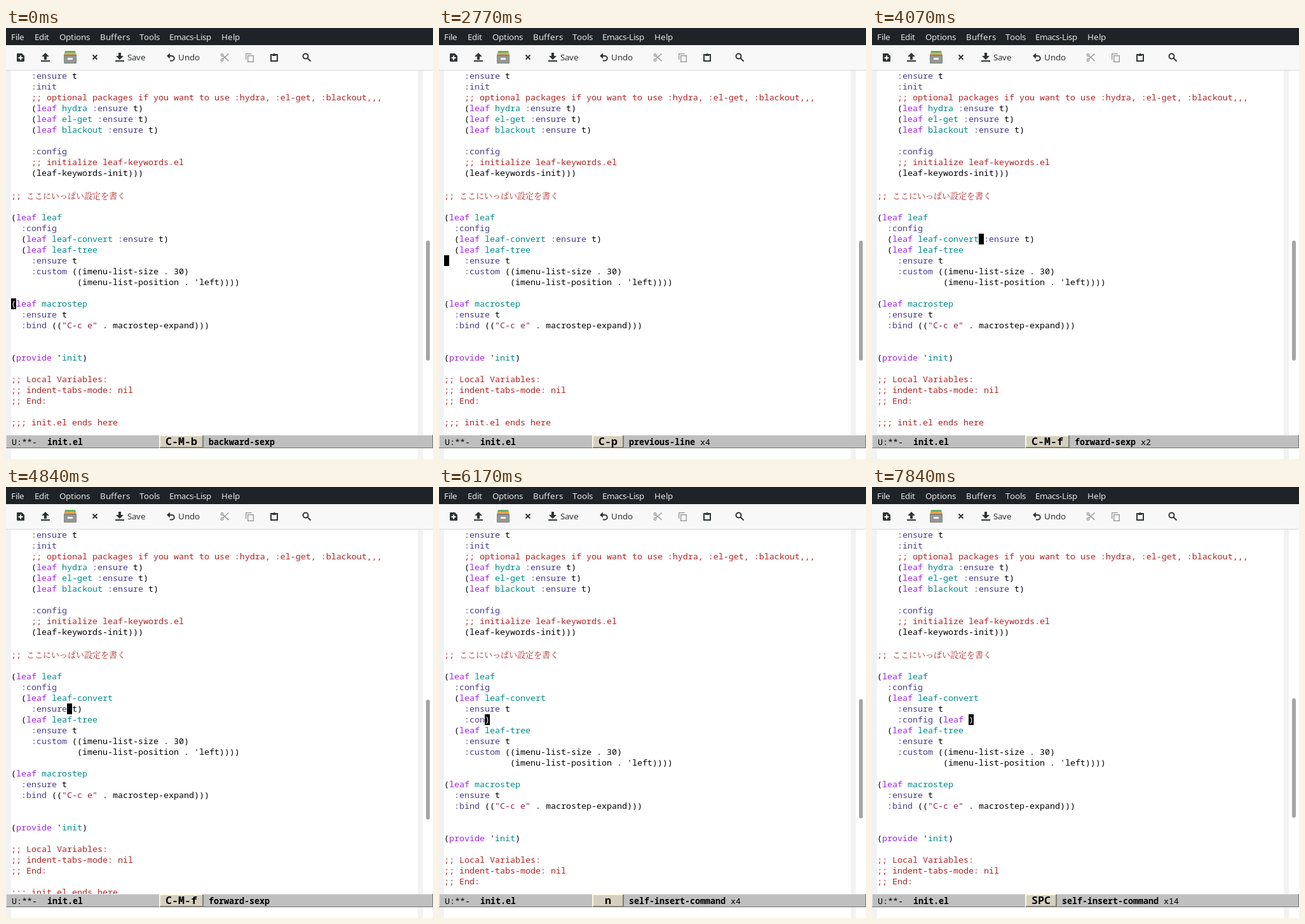
These frames come from a looping animation (672x679 px, 8000 ms). An HTML page:

```html
<!DOCTYPE html>
<html lang="ja">
<head>
<meta charset="utf-8">
<title>init.el</title>
<style>
  html, body { margin: 0; width: 100%; height: 100%; overflow: hidden; background: #fff; }
  svg { display: block; width: 672px; height: 679px; }
  text { white-space: pre; }
  .ui { font: 13.333px "Noto Sans", sans-serif; }
  .mono { font: 13.333px "Noto Sans Mono", monospace; }
  .bold { font-weight: bold; }
  .key { font-size: 16.667px; }
  .cjk { font: 13px "Noto Serif CJK JP", "Noto Sans CJK JP", serif; }
  .comment { fill: #b22222; }
  .string { fill: #8b2252; }
  .keyword { fill: #a020f0; }
  .constant { fill: #008b8b; }
  .builtin { fill: #483d8b; }
  .line { fill: none; stroke: #2f3436; stroke-width: 2; }
  .off { stroke: #8f9293; stroke-width: 1.3; }
</style>
</head>
<body>
<svg viewBox="0 0 672 679">
  <rect width="672" height="679" fill="#fff"/>
  <path d="M0 67h8v612H0zM648 67h8v612h-8z" fill="#f2f2f2"/>
  <rect id="thumb" x="661" width="6" rx="3" fill="#a4a6a6"/>

  <g id="code" class="mono"></g>
  <g id="cursor" class="mono">
    <rect width="8" height="17"/>
    <text y="13" fill="#fff"></text>
  </g>

  <rect width="672" height="27" fill="#1d2327"/>
  <rect y="27" width="672" height="39" fill="#f8f8f8"/>
  <rect y="66" width="672" height="1" fill="#dadada"/>
  <g id="menu" class="ui" fill="#e4e6e6"></g>
  <g id="tools" class="ui" fill="#2f3436"></g>

  <g fill="#2f3436">
    <path d="M17 41q0-1 1-1h7l4 4v8q0 1-1 1H18q-1 0-1-1z"/>
    <path d="M23 43.500v7M19.500 47h7" stroke="#f8f8f8" stroke-width="2"/>
    <path d="M62 39l6 6h-4v5h-4v-5h-4zM55 51h14v2H55z"/>
    <path d="M93 36h16l1 4H92z" fill="#63b56a"/>
    <path d="M92 39h18l1 4H91z" fill="#eda648"/>
    <rect x="91" y="42" width="20" height="14" rx="1" fill="#7f837f"/>
    <rect x="92" y="44" width="18" height="11" fill="#949894"/>
    <rect x="97" y="47" width="8" height="3" fill="#f4f4f2"/>
    <path class="line" d="M136.500 42.500l7 7M143.500 42.500l-7 7"/>
    <path d="M177 39h4v5h4l-6 6-6-6h4zM172 51h14v2h-14z"/>
    <path class="line" d="M256 44h5a3.700 3.700 0 0 1 0 7.500h-3"/>
    <path d="M253 44l5-4.500v9z"/>
    <g class="line off">
      <path d="M341 43.500l9.500 8.500M341 49l9.500-8.500"/>
      <circle cx="340" cy="42.500" r="1.800"/>
      <circle cx="340" cy="50.500" r="1.800"/>
      <path d="M377.700 50V40.700h9"/>
      <rect x="380.700" y="43.700" width="8.600" height="9.600"/>
    </g>
    <rect class="line" x="417" y="42" width="10" height="10"/>
    <path d="M419 41h1.500a1.600 1.600 0 0 1 3 0H425v3h-6z"/>
    <circle class="line" cx="471.500" cy="44.500" r="4"/>
    <path class="line" d="M474.500 47.500l5 5"/>
  </g>

  <rect y="641" width="672" height="21" fill="#bfbfbf"/>
  <path d="M0 641.500h672M.5 641v21" stroke="#e5e5e5"/>
  <path d="M0 661.500h672M671.500 641v21" stroke="#737373"/>
  <path d="M8 662h640v17H8z" fill="#fff"/>
  <path d="M0 662h8v17H0zM648 662h8v17h-8z" fill="#f2f2f2"/>
  <g class="mono">
    <text x="9" y="657">U:**-</text>
    <text x="65" y="657" class="bold">init.el</text>
    <rect id="cap" x="241" y="641" height="21" fill="#d5cfbf"/>
    <path id="light" fill="none" stroke="#fff8e5" stroke-width="2"/>
    <path id="shade" fill="none" stroke="#807c73" stroke-width="2"/>
    <text id="key" x="251" y="657" class="bold key"></text>
    <text id="command" y="657" class="bold"></text>
    <text id="count" y="657"></text>
  </g>
</svg>

<script>
const LOOP = 8000;
const CELL = 8;
const $ = id => document.getElementById(id);

const SOURCE = `    :ensure t
    :init
    ;; optional packages if you want to use :hydra, :el-get, :blackout,,,
    (leaf hydra :ensure t)
    (leaf el-get :ensure t)
    (leaf blackout :ensure t)

    :config
    ;; initialize leaf-keywords.el
    (leaf-keywords-init)))

;; ここにいっぱい設定を書く

(leaf leaf
  :config
  (leaf leaf-convert :ensure t)
  (leaf leaf-tree
    :ensure t
    :custom ((imenu-list-size . 30)
             (imenu-list-position . 'left))))

(leaf macrostep
  :ensure t
  :bind (("C-c e" . macrostep-expand)))


(provide 'init)

;; Local Variables:
;; indent-tabs-mode: nil
;; End:

;;; init.el ends here`.split("\n");

const EDIT_ROW = 15;
const VARIANTS = [
  () => ["  (leaf leaf-convert :ensure t)"],
  () => ["  (leaf leaf-convert", "    :ensure t)"],
  typed => ["  (leaf leaf-convert", "    :ensure t", `    ${typed})`],
];

// Build the key log: each run repeats one command and counts up.
const steps = [];
let breaks = 0, typed = "";
function run(key, command, times, spots) {
  times.forEach((time, i) => {
    const [row, col] = spots[i];
    if (command === "newline") breaks++;
    steps.push({ time, key, command, count: i + 1, row, col, breaks, typed });
  });
}
function type(text, times) {
  [...text].forEach((ch, i) => {
    typed += ch;
    steps.push({
      time: times[i], key: ch === " " ? "SPC" : ` ${ch} `, command: "self-insert-command",
      count: i + 1, row: 17, col: 4 + typed.length, breaks, typed,
    });
  });
}
run("C-M-b", "backward-sexp", [0], [[21, 0]]);
run("C-p", "previous-line", [2070, 2200, 2340, 2770, 2900, 3070],
  [20, 19, 18, 17, 16, 15].map(row => [row, 0]));
run("C-f", "forward-char", [3300, 3470, 3640], [[15, 1], [15, 2], [15, 3]]);
run("C-M-f", "forward-sexp", [3940, 4070], [[15, 7], [15, 20]]);
run("RET", "newline", [4440], [[16, 4]]);
run("C-M-f", "forward-sexp", [4840, 4970], [[16, 11], [16, 13]]);
run("RET", "newline", [5310], [[17, 4]]);
type(":config (leaf ",
  [5640, 6070, 6120, 6170, 6440, 6470, 6670, 7070, 7240, 7570, 7640, 7700, 7770, 7840]);

// [from, top, bottom] of the scroll bar thumb
const THUMB = [[0, 335, 524], [5310, 334, 523], [6070, 334, 522], [7570, 333, 521]];
const BLINK_OFF = [[170, 630], [1130, 1630]];

const TOKEN = new RegExp([
  "(?<comment>;.*)",
  '(?<string>"[^"]*")',
  "(?<keyword>(?<=\\()(?:leaf|provide)(?![\\w-]))",
  "(?<constant>(?<=\\(leaf |provide ')[\\w-]+)",
  "(?<builtin>:[\\w-]+)",
].join("|"), "g");

function highlight(line) {
  return line.replace(TOKEN, (match, ...rest) => {
    const groups = rest.at(-1);
    const face = Object.keys(groups).find(name => groups[name] !== undefined);
    const body = match.replace(/[\u3000-\u9fff]+/g, '<tspan class="cjk">$&</tspan>');
    return `<tspan class="${face}">${body}</tspan>`;
  });
}

// The Japanese row is two pixels taller than the others.
const rowTop = row => 67 + 17 * row + (row > 10 ? 2 : 0);

function bufferLines({ breaks, typed }) {
  const lines = SOURCE.slice();
  lines.splice(EDIT_ROW, 1, ...VARIANTS[breaks](typed));
  return lines.slice(0, 34);
}

function drawStep(step) {
  const lines = bufferLines(step);
  $("code").innerHTML = lines.map((line, row) =>
    `<text x="8" y="${rowTop(row) + 13}">${highlight(line)}</text>`).join("");

  $("cursor").setAttribute("transform", `translate(${8 + step.col * CELL} ${rowTop(step.row)})`);
  $("cursor").lastElementChild.textContent = lines[step.row][step.col] || "";

  const capWidth = (step.key.length + 2) * 10;
  const right = 241 + capWidth;
  const commandX = right + CELL;
  $("cap").setAttribute("width", capWidth);
  $("light").setAttribute("d", `M242 662V642H${right}`);
  $("shade").setAttribute("d", `M242 661H${right - 1}V642`);
  $("key").textContent = step.key;
  $("command").setAttribute("x", commandX);
  $("command").textContent = step.command;
  $("count").setAttribute("x", commandX + (step.command.length + 1) * CELL);
  $("count").textContent = step.count > 1 ? `x${step.count}` : "";
}

let shown;
function render(time) {
  const step = steps.findLast(s => s.time <= time);
  if (step !== shown) drawStep(shown = step);
  const hidden = BLINK_OFF.some(([from, to]) => time >= from && time < to);
  $("cursor").style.visibility = hidden ? "hidden" : "visible";
  const [, top, bottom] = THUMB.findLast(([from]) => from <= time);
  $("thumb").setAttribute("y", top);
  $("thumb").setAttribute("height", bottom - top);
}

// Toolkit labels advance by whole pixels, as hinted text does.
const pen = document.createElement("canvas").getContext("2d");
pen.font = '13.333px "Noto Sans", sans-serif';
function label(text, x, y) {
  const stops = [];
  for (const ch of text) {
    stops.push(x);
    x += Math.round(pen.measureText(ch).width);
  }
  return `<text x="${stops.join(" ")}" y="${y}">${text}</text>`;
}
const labels = (items, y) =>
  Object.entries(items).map(([text, x]) => label(text, x, y)).join("");

$("menu").innerHTML = labels(
  { File: 8, Edit: 45, Options: 84, Buffers: 148, Tools: 210, "Emacs-Lisp": 257, Help: 339 }, 19);
$("tools").innerHTML = labels({ Save: 191, Undo: 271 }, 51);

const start = performance.now();
function tick() {
  render((performance.now() - start) % LOOP);
  requestAnimationFrame(tick);
}
tick();
</script>
</body>
</html>
```
